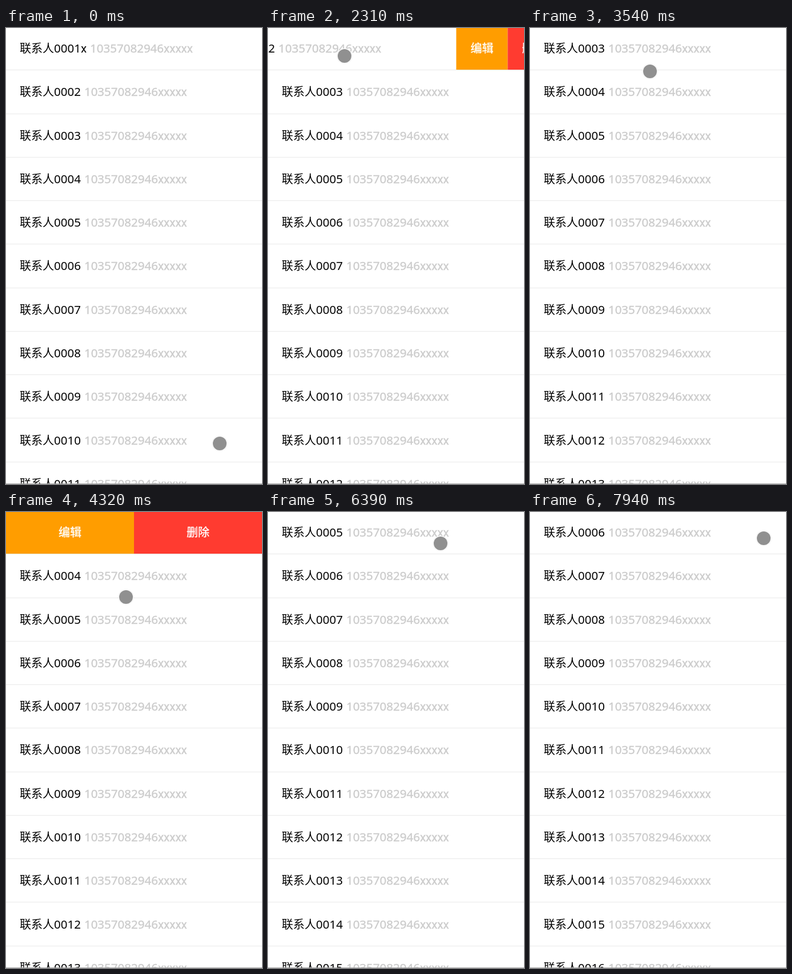
An HTML page with a canvas that plays this animation: 448 by 799 pixels, repeating every 8000 ms.

```html
<!DOCTYPE html>
<html lang="zh">
<head>
<meta charset="utf-8">
<style>
html, body { margin: 0; width: 100%; height: 100%; overflow: hidden; background: #fff; }
canvas { display: block; }
</style>
</head>
<body>
<canvas id="stage" width="448" height="799"></canvas>
<script>
const W = 448, H = 799, LOOP = 8000, STEP = 77;
const ROW = 76.28, LINE = 73.25, TOP_H = 73, BASE = 43, BUTTON = 90;
const DRAG = 460, TRAVEL = 231;
const CJK = '300 20px "Noto Sans CJK SC", "Noto Sans CJK", sans-serif';
const DIGITS = '20.5px "Noto Sans", "Open Sans", sans-serif';
const LETTERS = '20.5px Roboto, sans-serif';
const PHONE = '10357082946';
const ctx = document.getElementById('stage').getContext('2d');

// Each swipe grabs the top row at (x, y), pulls it by dx or dy, and ends in its removal.
// close: the row springs back before that; tap: time and place of the pointer's next stop.
const swipes = [
  { at: 940, x: 14, y: 58, dx: 196.4, dy: 0, remove: 1694 },
  { at: 2007, x: 252.5, y: 49, dx: -180, dy: 0, remove: 3157, tap: [2926, 403, 45] },
  { at: 3542, x: 210, y: 76, dx: 0, dy: TOP_H, close: 4466, remove: 4620 },
  { at: 5110, x: 264, y: 62, dx: 0, dy: -TOP_H, remove: 5852, tap: [5800, 336, 40] },
  { at: 6391, x: 302, y: 55, dx: -180, dy: 0, remove: 7623, tap: [7161, 420, 33] }
];

// Where the pointer stops outside the swipes: time, x, y
const stops = [[0, 374, 728], [231, 210, 70], [539, 63, 44], [7931, 409, 46]];
for (const { at, x, y, dx, dy, tap } of swipes) {
  stops.push([at, x, y], [at + DRAG, x + dx, y + dy]);
  if (tap) stops.push(tap);
}
stops.sort((a, b) => a[0] - b[0]);

const clamp = p => Math.min(1, Math.max(0, p));
const mix = (a, b, p) => a + (b - a) * p;
const pull = (swipe, t) => clamp((t - swipe.at) / DRAG);

function pointerAt(t) {
  const held = swipes.find(s => t >= s.at && t < s.at + DRAG);
  if (held) {
    const p = pull(held, t);
    return [held.x + held.dx * p, held.y + held.dy * p];
  }
  const i = stops.findIndex(s => s[0] > t);
  if (i < 0) return stops[stops.length - 1].slice(1);
  const [from, x0, y0] = stops[i - 1], [to, x1, y1] = stops[i];
  const begin = Math.max(from, to - TRAVEL);
  const p = clamp((t - begin) / (to - begin));
  return [mix(x0, x1, p), mix(y0, y1, p)];
}

// Draws a piece of text and returns where the next one starts
function run(text, font, x, y, weight = 0) {
  ctx.font = font;
  ctx.fillText(text, x, y);
  if (weight) {
    ctx.lineWidth = weight;
    ctx.strokeText(text, x, y);
  }
  return x + ctx.measureText(text).width;
}

function contact(n, x, y) {
  ctx.fillStyle = '#000';
  x = run('联系人', CJK, x + 24, y);
  x = run(String(n).padStart(4, '0'), DIGITS, x, y);
  if (n === 1) x = run('x', LETTERS, x, y);
  ctx.fillStyle = ctx.strokeStyle = '#ccc';
  x = run(PHONE, DIGITS, x + 6, y, 0.4);
  run('xxxxx', LETTERS, x, y, 0.4);
}

function buttons(x, y, width) {
  [['编辑', '#ff9d00'], ['删除', '#ff3b30']].forEach(([label, color], i) => {
    const left = x + i * width;
    ctx.fillStyle = color;
    ctx.fillRect(left, y, width, TOP_H);
    ctx.fillStyle = ctx.strokeStyle = '#fff';
    run(label, CJK, left + width / 2 - 20, y + BASE, 0.4);
  });
}

function topRow(n, dx, dy) {
  ctx.save();
  ctx.beginPath();
  ctx.rect(0, 0, W, TOP_H);
  ctx.clip();
  contact(n, dx, BASE + dy);
  if (dx) buttons(dx > 0 ? dx - 2 * BUTTON : W + dx, 0, BUTTON);
  if (dy) buttons(0, Math.round(dy > 0 ? dy - TOP_H : TOP_H + dy), W / 2);
  ctx.restore();
}

function disc(x, y, r, color) {
  ctx.fillStyle = color;
  ctx.beginPath();
  ctx.arc(x, y, r, 0, 2 * Math.PI);
  ctx.fill();
}

function draw(now) {
  const t = Math.floor((now % LOOP + 4) / STEP) * STEP;
  const removed = swipes.filter(s => t >= s.remove).length;
  const first = removed + 1;
  ctx.fillStyle = '#fff';
  ctx.fillRect(0, 0, W, H);
  for (let i = 0; i < 11; i++) {
    if (i) contact(first + i, 0, Math.round(BASE + i * ROW));
    ctx.fillStyle = '#e9e9e9';
    ctx.fillRect(0, Math.round(LINE + i * ROW), W, 1);
  }

  const swipe = swipes[removed];
  const p = swipe && t < (swipe.close || swipe.remove) ? pull(swipe, t) : 0;
  topRow(first, p ? swipe.dx * p : 0, p ? swipe.dy * p : 0);

  ctx.fillStyle = '#aaa';
  ctx.fillRect(0, H - 1, W, 1);

  const [x, y] = pointerAt(t);
  disc(x, y, 13.6, '#e4e4e4');
  disc(x, y, 13.2, '#fff');
  disc(x, y, 12, '#909090');
}

const start = performance.now();
function tick() {
  draw(performance.now() - start);
  requestAnimationFrame(tick);
}
tick();
</script>
</body>
</html>
```
